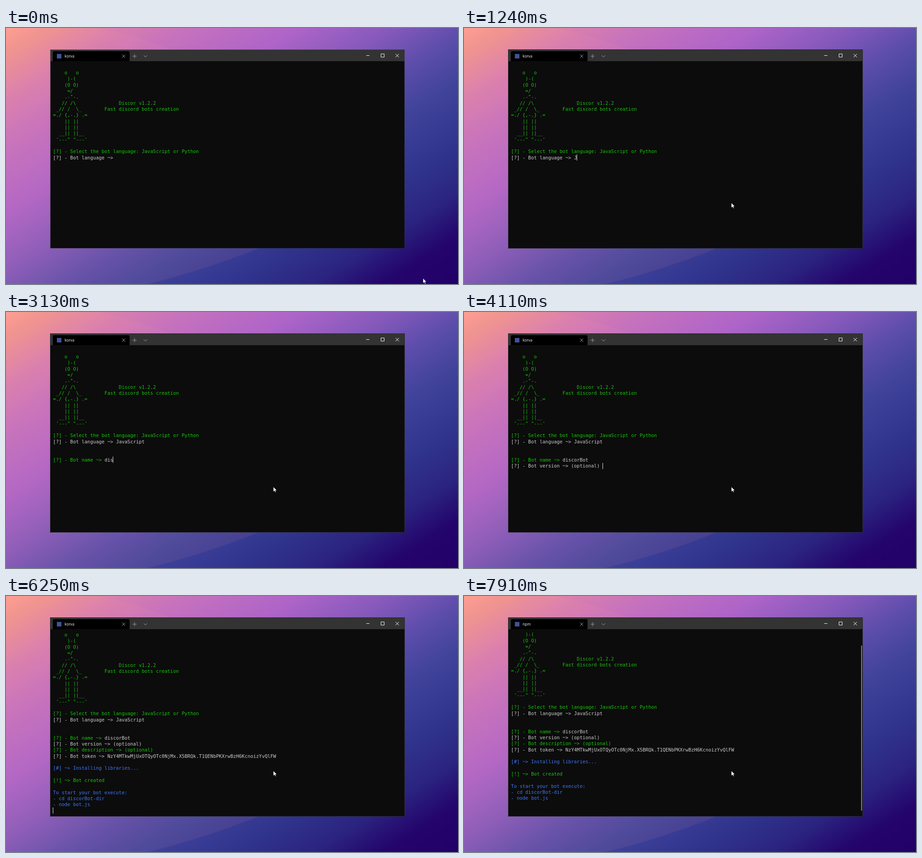
Animation, 995 px wide and 563 px high, one loop 8000 ms. Source, as an HTML page:

```html
<!DOCTYPE html>
<html lang="en">
<head>
<meta charset="utf-8">
<title>Terminal</title>
<style>
  html, body { margin: 0; width: 100%; height: 100%; overflow: hidden; }
  body {
    background: linear-gradient(148deg, #ff9f92 0%, #ee938f 5%, #d97fae 13%, #c672bd 21%,
      #ae64c8 34%, #8559bb 45%, #5c4dab 54%, #42449c 62%, #30348c 74%, #2b2480 83%,
      #24056c 91%, #220068 100%);
  }
  svg { display: block; width: 995px; height: 563px; }
  #term text { font: 10.465px "DejaVu Sans Mono", monospace; white-space: pre; }
  #tab { font: 8.3px "Open Sans", sans-serif; fill: #fff; }
  .line { fill: none; stroke-width: 1; }
</style>
</head>
<body>
<svg viewBox="0 0 995 563">
  <defs><clipPath id="view"><rect x="98" y="78" width="779" height="406"/></clipPath></defs>
  <path d="M0 0H200Q285 17 365 48L555 485Q430 535 310 563H0Z" fill="#ff9696" opacity=".08"/>

  <rect id="frame" x="97" y="47" width="781" height="438" fill="#2b2b30"/>
  <rect x="98" y="48" width="779" height="436" fill="#0c0c0c"/>
  <rect x="98" y="48" width="779" height="25" fill="#333"/>
  <path d="M103 73V54q0-3 3-3H269q3 0 3 3V73Z" fill="#000"/>
  <rect x="112" y="57" width="10" height="10" fill="#3f5299"/>
  <text id="tab" x="129" y="65"></text>
  <path class="line" stroke="#a39ba3" d="M255.5 58.5l7 7m0-7l-7 7M278.5 62h9m-4.500-4.500v9M303 60l4 4 4-4"/>
  <path class="line" stroke="#fff" d="M793 60.500h7M825.500 57h7v7h-7zM857.500 57l7.500 7.500m0-7.500l-7.500 7.500"/>

  <g clip-path="url(#view)"><g id="term"></g></g>
  <rect id="caret" width="1" height="13.500" fill="#e6e6e6"/>
  <rect id="bar" x="874.500" y="109" width="1.500" height="363" fill="#a8a8a8"/>

  <path id="mouse" d="M0 0V11L2.600 8.600 4.300 12.300 6 11.500 4.400 8H7.800Z" fill="#fff" stroke="#000" stroke-width=".6"/>
  <circle id="click" cx="588" cy="384" r="8.500" fill="#ff0" opacity=".5"/>
</svg>
<script>
const LOOP = 8000, LEFT = 103.6, TOP = 78.4, CHAR = 6.3, LINE = 40 / 3;
const GREEN = '#16c60c', WHITE = '#ccc', BLUE = '#3b78ff';
const $ = id => document.getElementById(id);
const rowY = row => TOP + LINE * row;
const colX = col => LEFT + CHAR * col;

function put(row, col, string, color, from = 0) {
  const el = document.createElementNS('http://www.w3.org/2000/svg', 'text');
  el.setAttribute('x', colX(col));
  el.setAttribute('y', Math.round(rowY(row) + 10.4));
  el.setAttribute('fill', color);
  el.textContent = string;
  $('term').append(el);
  return { el, row, col, string, from };
}

const art = String.raw`
    o   o
     )-(
    (O O)
     =/
    .-"-.
   // /\               Discor v1.2.2
 _// /  \_        Fast discord bots creation
=./ {,-.} .=
    || ||
    || ||
  __|| ||__
 '---" "---'

[?] - Select the bot language: JavaScript or Python`;
art.split('\n').forEach((string, row) => put(row, 0, string, GREEN));

const output = [
  put(15, 0, '[?] - Bot language ~> ', WHITE),
  put(18, 0, '[?] - Bot name ~> ', GREEN, 2710),
  put(19, 0, '[?] - Bot version ~> (optional) ', WHITE, 4110),
  put(20, 0, '[?] - Bot description ~> (optional) ', GREEN, 4540),
  put(21, 0, '[?] - Bot token ~> ', WHITE, 5040),
  put(23, 0, '[#] ~> Installing libraries...', BLUE, 6250),
  put(25, 0, '[!] ~> Bot created', GREEN, 6250),
  put(27, 0, 'To start your bot execute:', BLUE, 6250),
  put(28, 0, '- cd discorBot-dir', BLUE, 6250),
  put(29, 0, '- node bot.js', BLUE, 6250)
];

// Typed answers with the time of each key
const token = 'NzY4MTkwMjUxOTQyOTc0NjMx.X5BRQk.T1QENbPKXrwBzH6KcnoizYvQlFW';
const typed = [
  { ...put(15, 22, 'JavaScript', WHITE), keys: [1140, 1370, 1520, 1650, 1830, 2030, 2220, 2260, 2400, 2530] },
  { ...put(18, 18, 'discorBot', WHITE), keys: [2950, 3040, 3130, 3320, 3410, 3410, 3710, 3750, 3930] },
  { ...put(21, 19, token, WHITE), keys: Array(token.length).fill(5650) }
];

// Caret stops: time, row, column
const stops = [[200, 15, 22], [2710, 18, 18], [4070, 19, 0], [4110, 19, 32], [4480, 20, 0],
  [4540, 20, 36], [5040, 21, 19], [6250, 30, 0], [6300, 31, 0]];
const hidden = [[0, 200], [760, 1140], [5650, 5710], [6850, 7360], [7910, LOOP]];

const show = (el, on) => el.setAttribute('visibility', on ? 'visible' : 'hidden');

function draw(t) {
  const scroll = t < 6250 ? 0 : t < 6300 ? 1 : 2;
  let [, row, col] = stops.findLast(s => s[0] <= t) || stops[0];

  for (const o of output) show(o.el, t >= o.from);
  for (const w of typed) {
    const n = w.keys.filter(k => k <= t).length;
    w.el.textContent = w.string.slice(0, n);
    if (row === w.row && col === w.col) col += n;
  }
  $('term').setAttribute('transform', `translate(0 ${-Math.round(scroll * LINE)})`);

  $('caret').setAttribute('x', Math.floor(colX(col)));
  $('caret').setAttribute('y', Math.round(rowY(row - scroll)));
  show($('caret'), !hidden.some(([a, b]) => t >= a && t < b));

  $('tab').textContent = t < 6520 ? 'korva' : 'npm';
  show($('bar'), t >= 6300);
  $('frame').setAttribute('opacity', t < 200 ? 0.45 : 1);

  const p = Math.min(1, Math.max(0, (t - 20) / 150));
  const e = p * p * (3 - 2 * p);
  $('mouse').setAttribute('transform', `translate(${918 - 329.5 * e} ${550.5 - 166 * e})`);
  show($('click'), t >= 200 && t < 300);
}

const start = performance.now();
function tick() {
  draw((performance.now() - start) % LOOP);
  requestAnimationFrame(tick);
}
tick();
</script>
</body>
</html>
```
